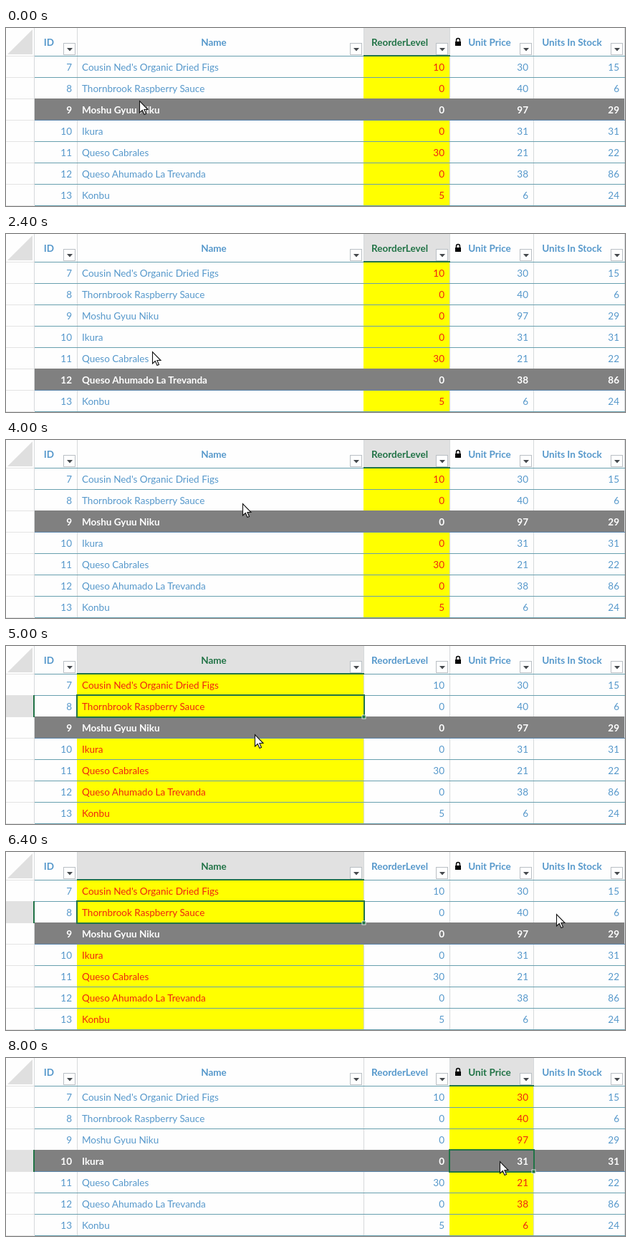
An HTML page that plays this animation: 864 by 250 pixels, repeating every 8200 ms.

```html
<!DOCTYPE html>
<html lang="en">
<head>
<meta charset="utf-8">
<title>Spreadsheet row highlight</title>
<style>
  html, body { margin: 0; width: 100%; height: 100%; overflow: hidden; background: #fefefe; }
  svg { display: block; }
  text { font: 13.5px Lato, Carlito, sans-serif; white-space: pre; }
  .bold { font-weight: 700; }
</style>
</head>
<body>
<svg id="stage" width="864" height="250" viewBox="0 0 864 250"></svg>
<script>
const LOOP = 8200, STEP = 200, TOP = 39, ROW = 30, FIRST_ID = 7;
const GREEN = '#217346', BLUE = '#5698cb', RED = '#ee2410', GRAY = '#808080';
const LINE = '#679fae', GRID = '#d6d9db', SHADE = '#e1e1e1', YELLOW = '#ffff00';

const columns = [
  { title: 'ID', left: 39, right: 99, center: 60 },
  { title: 'Name', left: 99, right: 499, center: 290 },
  { title: 'ReorderLevel', left: 499, right: 619, center: 549.5 },
  { title: 'Unit Price', left: 619, right: 736, center: 675 },
  { title: 'Units In Stock', left: 736, right: 863, center: 790 }
];
const rows = [
  [7, "Cousin Ned's Organic Dried Figs", 10, 30, 15],
  [8, 'Thornbrook Raspberry Sauce', 0, 40, 6],
  [9, 'Moshu Gyuu Niku', 0, 97, 29],
  [10, 'Ikura', 0, 31, 31],
  [11, 'Queso Cabrales', 30, 21, 22],
  [12, 'Queso Ahumado La Trevanda', 0, 38, 86],
  [13, 'Konbu', 5, 6, 24]
];

// Pointer path: time, x, y
const path = [
  [0, 186, 103], [600, 170, 165], [1000, 150, 170], [1400, 138, 118],
  [1600, 133, 133], [2200, 175, 190], [2800, 262, 118], [3000, 283, 120],
  [3400, 325, 146], [4000, 330, 90], [4400, 326, 86], [4800, 342, 118],
  [5000, 347, 125], [5400, 480, 158], [5800, 634, 129], [6400, 768, 88],
  [6800, 772, 90], [7200, 772, 90], [7800, 689, 146], [8000, 689, 146]
];
// Clicked cells; the first one is scrolled out of view
const clicks = [
  { time: 0, col: 2, id: 0 },
  { time: 4400, col: 1, id: 8 },
  { time: 6600, col: 4, id: 8 },
  { time: 7800, col: 3, id: 10 }
];

const rect = (x, y, w, h, fill, more = '') =>
  `<rect x="${x}" y="${y}" width="${w}" height="${h}" fill="${fill}" ${more}/>`;
const label = (x, y, value, fill, anchor, bold) =>
  `<text x="${x}" y="${y}" fill="${fill}" text-anchor="${anchor}"${bold ? ' class="bold"' : ''}>${value}</text>`;
const rowTop = id => TOP + (id - FIRST_ID) * ROW;

function pointerAt(time) {
  const next = path.findIndex(p => p[0] > time);
  if (next < 0) return path[path.length - 1].slice(1);
  const [t0, x0, y0] = path[next - 1], [t1, x1, y1] = path[next];
  const k = (time - t0) / (t1 - t0);
  return [Math.round(x0 + (x1 - x0) * k), Math.round(y0 + (y1 - y0) * k)];
}

function drawHeader(active) {
  let out = '<path d="M37 2V37H2Z" fill="#dfdfdf"/>';
  columns.forEach(({ title, left, right, center }, i) => {
    const on = i === active;
    if (on) out += rect(left, 0, right - left + 1, 38, SHADE);
    out += rect(left, 0, 1, 39, GRID);
    out += label(center, 25, title, on ? GREEN : BLUE, 'middle', true);
    const x = right - 19;
    out += rect(x + .5, 21.5, 16, 16, '#fff', 'stroke="#b9bfc4"');
    out += `<path d="M${x + 5} 28h8l-4 4.5z" fill="#45494d"/>`;
  });
  out += rect(627, 19, 8, 6, '#000');
  out += '<path d="M628.5 19v-2a2.5 2.5 0 0 1 5 0v2" fill="none" stroke="#000" stroke-width="1.4"/>';
  return out;
}

function drawRow(cells, cell, hoverId) {
  const id = cells[0], y = rowTop(id), hover = id === hoverId;
  let out = '';
  if (id === cell.id) out += rect(0, y + 1, 39, ROW - 1, SHADE);
  columns.forEach(({ left, right }, i) => {
    const on = i === cell.col;
    if (on) out += rect(left, y, right - left + 1, ROW, YELLOW);
    else out += rect(left, y, 1, ROW, GRID);
  });
  if (hover) out += rect(40, y, 824, ROW, GRAY);
  cells.forEach((value, i) => {
    const fill = hover ? '#fff' : i === cell.col ? RED : BLUE;
    const name = i === 1;
    out += label(name ? 106 : columns[i].right - 7, y + 21, value, fill, name ? 'start' : 'end', hover);
  });
  return out;
}

function drawLines(cell, hoverId) {
  let out = rect(863, 0, 1, 250, GRID);
  for (let id = FIRST_ID; id <= 14; id++) {
    const y = rowTop(id);
    out += rect(0, y, 39, 1, '#e3e3e3');
    if (id !== hoverId) out += rect(40, y, 824, 1, id === hoverId + 1 ? '#5b86ad' : LINE);
  }
  const { left, right } = columns[cell.col];
  out += rect(left, 38, right - left + 1, 2, GREEN);
  if (cell.id) {
    const y = rowTop(cell.id);
    out += rect(38, y, 2, ROW + 1, GREEN);
    out += rect(left, y, right - left + 1, ROW + 1, 'none', `stroke="${GREEN}" stroke-width="2"`);
    out += rect(right - 2, y + ROW - 2, 5, 5, GREEN, 'stroke="#fff" stroke-width=".8"');
  }
  return out;
}

function drawPointer([x, y]) {
  return `<path transform="translate(${x + .5} ${y - .5})" d="M0 0V16.5L3.8 13L6.5 19L9 18L6.4 12H11.5Z"
    fill="#fff" stroke="#111" stroke-width="1.1"/>`;
}

const stage = document.getElementById('stage');
let shown = -1;

function render(time) {
  const cell = clicks.filter(c => c.time <= time).pop();
  // The highlight trails the pointer by one step
  const hoverY = pointerAt(Math.max(0, time - STEP))[1];
  const hoverId = FIRST_ID + Math.floor((hoverY - TOP) / ROW);
  stage.innerHTML = rect(0, 0, 864, 250, '#fefefe') + drawHeader(cell.col) +
    rows.map(cells => drawRow(cells, cell, hoverId)).join('') +
    drawLines(cell, hoverId) + drawPointer(pointerAt(time));
}

const start = performance.now();
function tick() {
  const elapsed = (performance.now() - start) % LOOP;
  const time = Math.floor(elapsed / STEP) * STEP;
  if (time !== shown) render(shown = time);
  requestAnimationFrame(tick);
}
tick();
</script>
</body>
</html>
```
